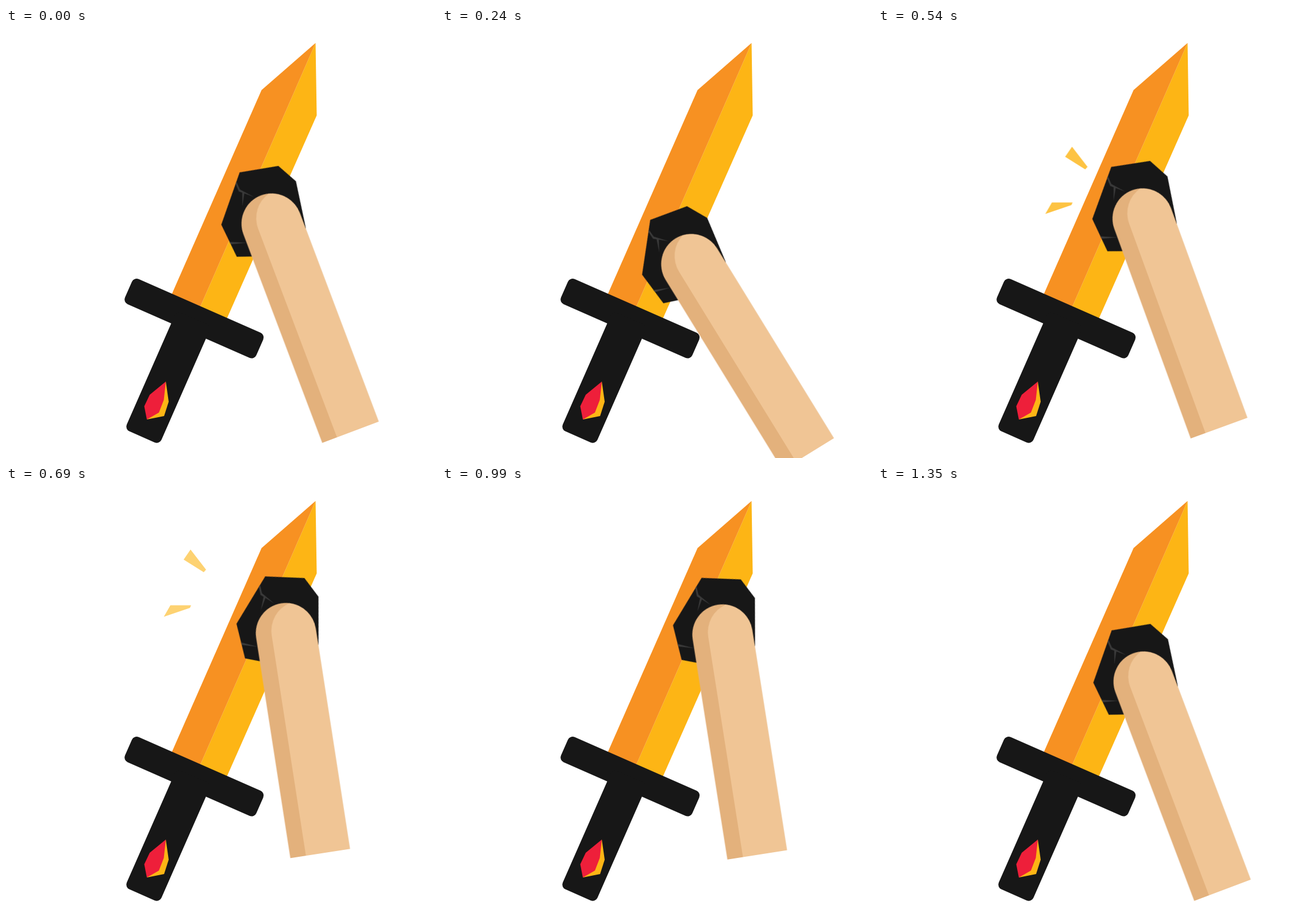
Recreate the animation shown at these times as an HTML page without scripts. Size 748 by 748 pixels, loop 1.38 s.

```html
<!DOCTYPE html>
<html lang="en">
<head>
<meta charset="utf-8">
<title>Sword polishing</title>
<style>
  html, body { margin: 0; width: 100%; height: 100%; overflow: hidden; background: #fff; }
  svg { display: block; width: 100vw; height: 100vh; }

  .black { fill: #171717; }
  .amber { fill: #fdb515; }
  .orange { fill: #f79122; }
  .red { fill: #ee1f3a; }
  .crack { fill: #3a3a3a; }
  .skin { fill: #f0c595; }
  .shade { fill: #e3b17c; }

  /* 46 ticks of 30 ms; the small negative delay keeps ticks clear of rounding */
  .arm, .sparks { animation: 1380ms -2ms infinite; }
  .arm { animation-name: rub; }
  .sparks { animation-name: drift, fade; }

  @keyframes rub {
    0% { transform: translate(462px, 340.3px) rotate(-20.7deg); animation-timing-function: steps(11); }
    23.913% { transform: translate(423px, 437.2px) rotate(-35.7deg); animation-timing-function: steps(15); }
    56.522% { transform: translate(502.9px, 210.6px) rotate(-2.1deg); animation-timing-function: steps(19); }
    97.826%, 100% { transform: translate(462px, 340.3px) rotate(-20.7deg); }
  }
  @keyframes drift {
    0%, 30.435% { transform: translate(29.7px, 172.8px); animation-timing-function: steps(9); }
    50% { transform: translate(0, 0); animation-timing-function: steps(6); }
    63.043%, 100% { transform: translate(-16.5px, -119px); }
  }
  @keyframes fade {
    0%, 30.435% { opacity: 0; animation-timing-function: steps(5); }
    41.304% { opacity: 1; animation-timing-function: steps(10); }
    63.043%, 100% { opacity: 0; }
  }
</style>
</head>
<body>
<svg viewBox="0 0 748 748">
  <g class="sparks amber">
    <path d="M321 110.5 309 128 344 150 348 145.5Z"/>
    <path d="M286 207.5H322L320 212 274.5 227.5Z"/>
  </g>

  <g class="sword">
    <path class="amber" d="M538.5 26 540.5 152 380 515 330 503Z"/>
    <path class="orange" d="M538.5 26 444.5 108 284 473 330 503Z"/>
    <g class="black" transform="translate(327.2 505.3) rotate(23.73)">
      <rect x="-124.8" y="-23.9" width="249.6" height="47.8" rx="9"/>
      <rect x="-33" y="0" width="66" height="225" rx="9"/>
    </g>
    <path class="amber" d="M278 615 283 650 275 675 245 681Z"/>
    <path class="red" d="M278 615 250 638 240.5 658 245 681 266 669 274.5 647Z"/>
  </g>

  <!-- origin: centre of the rounded arm end -->
  <g class="arm">
    <path class="black" d="M-20.5-103 46.5-89.8 65.7-54 53 28.5 0 45-52 41.5-77 32.6-82.5-29.2Z"/>
    <g class="crack">
      <path d="M-34-87-31.5-90-30.5-75-12-54-33.5-72.5Z"/>
      <path d="M-28.5-69-25.5-66.5-37-46Z"/>
      <path d="M-79.5 4-51.9 15.9-79 8.5Z"/>
    </g>
    <path class="shade" d="M-52.4 0A52.4 52.4 0 0 1 52.4 0V388H-52.4Z"/>
    <path class="skin" d="M13.7-50.6A52.4 52.4 0 0 1 52.4 0V388H-25V0A52.4 52.4 0 0 1 13.7-50.6Z"/>
  </g>
</svg>
</body>
</html>
```
